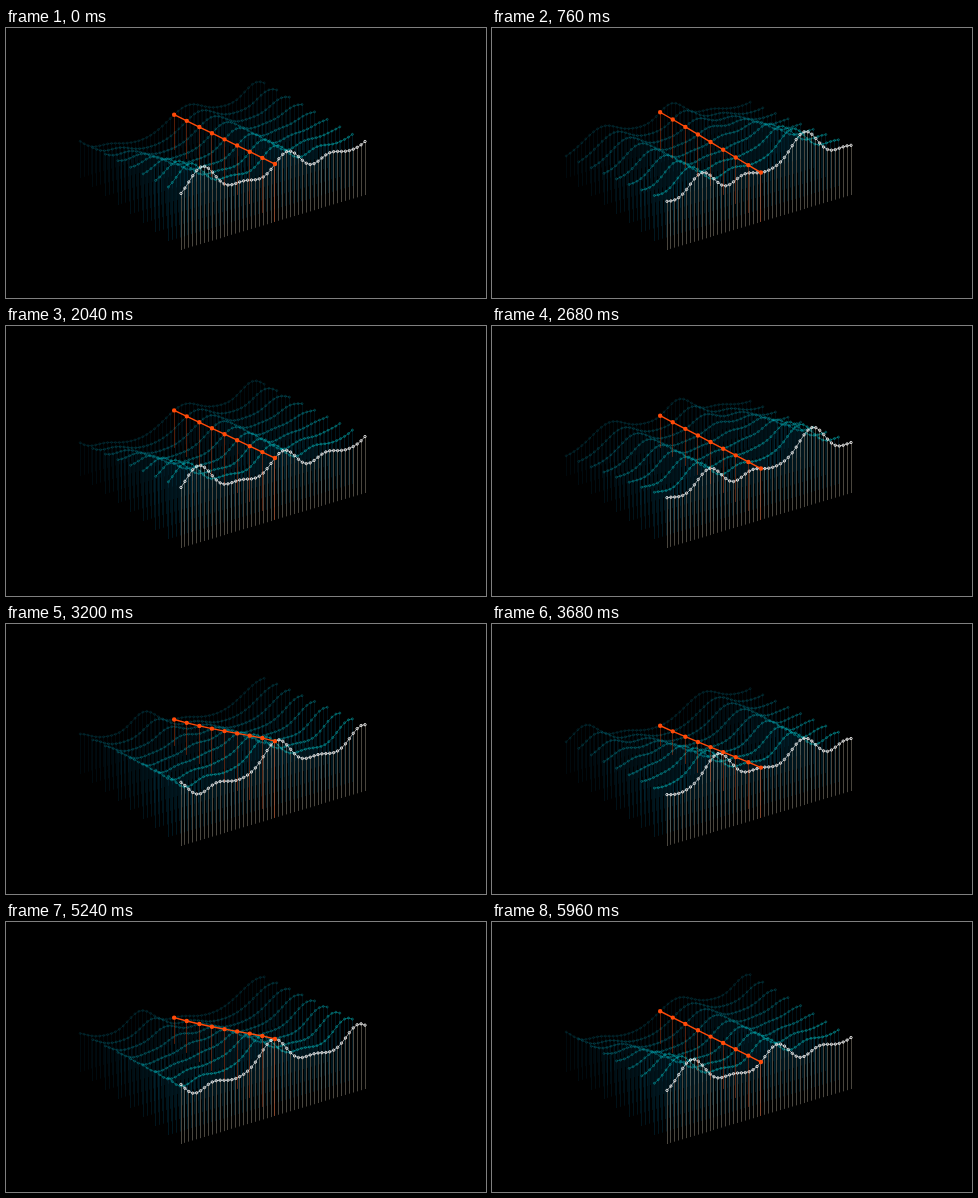
An HTML page with a canvas that plays this animation: 480 px wide and 270 px high, repeating every 6 s.

```html
<!DOCTYPE html>
<html lang="en">
<head>
<meta charset="utf-8">
<title>Wave history</title>
<style>
html, body { margin: 0; width: 100%; height: 100%; overflow: hidden; background: #000; }
canvas { display: block; width: 480px; height: 270px; }
</style>
</head>
<body>
<canvas id="stage" width="480" height="270"></canvas>
<script>
const ctx = document.getElementById('stage').getContext('2d');
const LOOP = 6000, STEP = 40, CYCLES = 3;
const ROWS = 9, COLS = 48, MARK = 24;
const TAU = Math.PI * 2;
const ORANGE = '#ff4a08';

// Cosine and sine weights by harmonic: the front wave, and what depth adds to it.
const FRONT = [[56.1, 0], [3, 3.36], [3.74, 8.58], [-3.64, 1.05], [-2.27, 4.07], [0, -1.8], [-0.35, -0.54]];
const DEPTH = [[-5, 0], [-1.4, -14.9], [5.6, -6.7], [3.3, -7.3], [2.1, -5.9]];

function series(weights, angle) {
  return weights.reduce((sum, [c, s], k) => sum + c * Math.cos(k * angle) + s * Math.sin(k * angle), 0);
}

function height(row, col, turn) {
  const angle = TAU * (col / COLS + turn);
  const depth = (row / (ROWS - 1)) ** 1.3;
  return (series(FRONT, angle) + depth * series(DEPTH, angle)) * (1 - 0.05 * row);
}

function point(row, col, turn) {
  const base = 222 - col * 1.17 - row * 9;
  return { x: 175 + col * 3.915 - row * 12.6, base, y: base - height(row, col, turn) };
}

function stems(points, color) {
  ctx.strokeStyle = color;
  ctx.lineWidth = 1;
  ctx.beginPath();
  for (const { x, y, base } of points) {
    const px = Math.floor(x) + 0.5;
    ctx.moveTo(px, y);
    ctx.lineTo(px, base);
  }
  ctx.stroke();
}

function line(points, color, width) {
  ctx.strokeStyle = color;
  ctx.lineWidth = width;
  ctx.beginPath();
  for (const { x, y } of points) ctx.lineTo(x, y);
  ctx.stroke();
}

function dots(points, color, radius, hollow) {
  ctx.fillStyle = ctx.strokeStyle = color;
  ctx.lineWidth = 0.8;
  ctx.beginPath();
  for (const { x, y } of points) {
    ctx.moveTo(x + radius, y);
    ctx.arc(x, y, radius, 0, TAU);
  }
  if (hollow) ctx.stroke();
  else ctx.fill();
}

function drawRow(row, points) {
  if (row === 0) {
    stems(points, 'rgba(255,240,215,.29)');
    line(points, 'rgba(255,255,255,.75)', 0.8);
    dots(points, '#fff', 1.2, true);
    return;
  }
  const fade = 1 - row / ROWS;
  stems(points, `rgba(0,90,125,${0.08 + 0.2 * fade})`);
  const color = `rgba(0,${140 + 60 * fade},${170 + 30 * fade},${0.15 + 0.45 * fade})`;
  line(points, color, 0.8);
  dots(points, color, 1, true);
}

function draw(time) {
  const turn = CYCLES * time / LOOP;
  ctx.fillStyle = '#000';
  ctx.fillRect(0, 0, 480, 270);
  const marks = [];
  for (let row = ROWS - 1; row >= 0; row--) {
    const points = Array.from({ length: COLS }, (_, col) => point(row, col, turn));
    drawRow(row, points);
    marks.push(points[MARK]);
  }
  stems(marks, 'rgba(255,69,0,.33)');
  line(marks, ORANGE, 1.4);
  dots(marks, ORANGE, 2.2);
}

const start = performance.now();
function tick() {
  const time = (performance.now() - start) % LOOP;
  draw(Math.floor(time / STEP) * STEP);
  requestAnimationFrame(tick);
}
tick();
</script>
</body>
</html>
```
